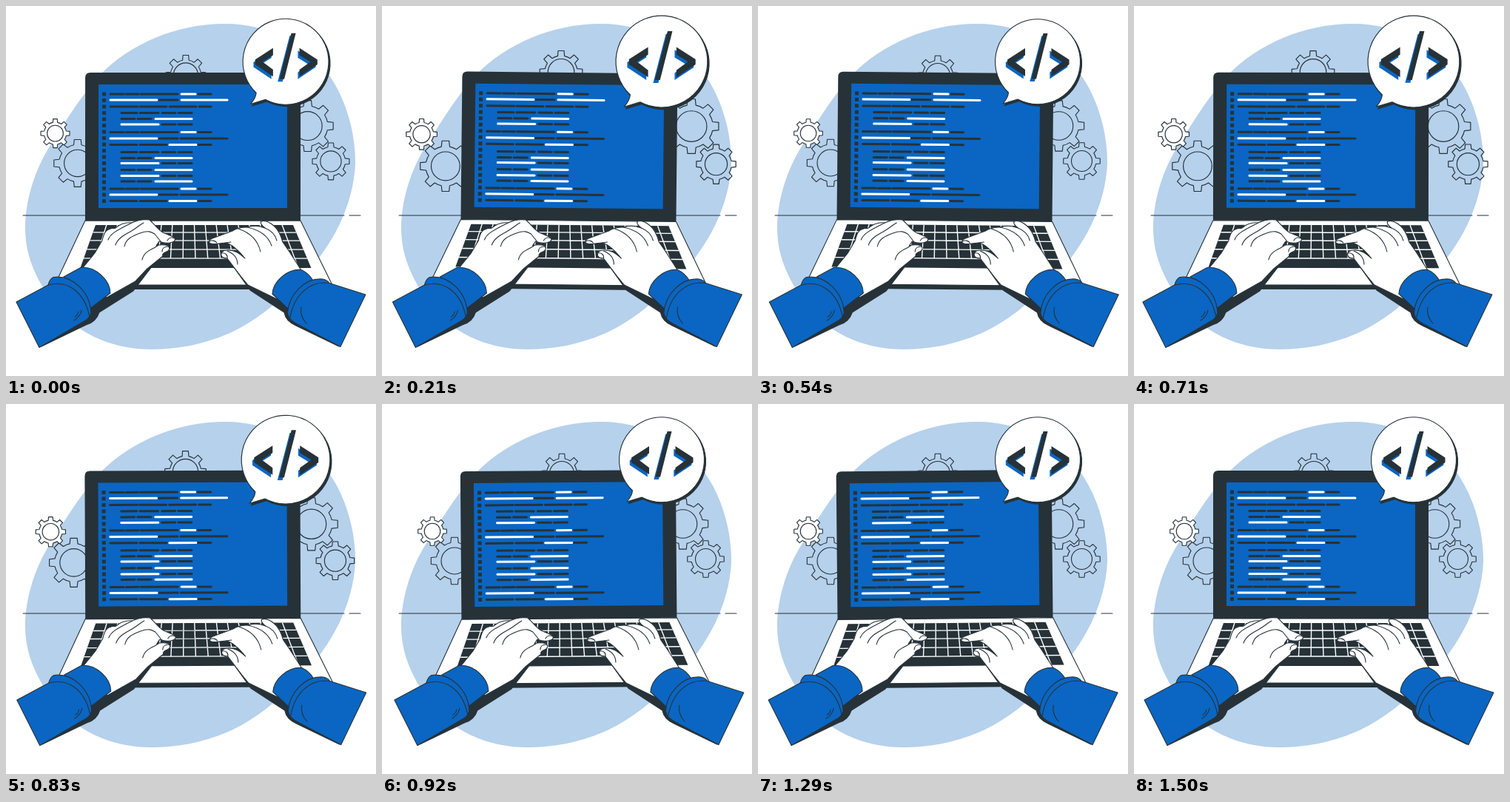
Write an HTML page that moves like this. It is 500 by 500 pixels and loops after 1.54 s.

```html
<!DOCTYPE html>
<html lang="en">
<head>
<meta charset="utf-8">
<title>Typing code</title>
<style>
  @property --t { syntax: '<number>'; inherits: true; initial-value: 0; }

  html, body { margin: 0; width: 100%; height: 100%; overflow: hidden; background: #fff; }
  svg {
    display: block; width: 100%; height: 100%;
    --ink: #263238; --blue: #0a66c2; --pale: #b6d1ec;
    animation: tick 1.54s steps(37) -4ms infinite;
  }
  /* One clock drives every part; 1 is a full cycle. */
  @keyframes tick { from { --t: .008; } to { --t: 1.0276; } }

  .beat {
    --h: max(0, min(var(--t) * 10, (.3 - var(--t)) * 5), min((var(--t) - .4) * 10, (.6 - var(--t)) * 10));
    transform: scale(calc(1 + .1 * var(--h)));
  }
  #gears { transform-origin: 255.5px 155px; }
  #bubble { transform-origin: 379px 77.5px; }
  #laptop {
    transform-origin: 253px 236px;
    transform: rotate(calc(1deg * max(min(var(--t) * 4, 2 - var(--t) * 4), var(--t) * 4 - 4)));
  }
  #hands {
    --v: max(var(--t) * 10 - 5, 5 - var(--t) * 10);
    transform: translateX(calc(1px * (8 * var(--v) - 4
      - 16 * max(0, var(--v) - 1) + 14 * max(0, var(--v) - 2)
      - 9 * max(0, var(--v) - 3) + 4 * max(0, var(--v) - 4))));
  }

  .ink { fill: var(--ink); }
  .blue { fill: var(--blue); }
  .white { fill: #fff; }
  .line { fill: none; }
  .edge { stroke: var(--ink); stroke-width: 1.1; stroke-linejoin: round; stroke-linecap: round; }
  #code path { stroke-width: 3; stroke-linecap: round; fill: none; }
  #keys { stroke: #fff; stroke-width: 1.4; fill: none; }
</style>
</head>
<body>
<svg viewBox="0 0 500 500">
  <defs>
    <path id="balloon" d="M338.500 117A57.500 57.500 0 1 1 351 126L331 132Q338 124 338.500 117Z"/>
    <g id="tag">
      <path d="M361 57V66.500L347 75.500L361 86V95L337 79V72.500Z"/>
      <path d="M385.500 37H391.500L376 98.500H369.500Z"/>
      <path d="M396.500 57L420.500 72.500V79L396.500 95V86L411 75.500L396.500 66.500Z"/>
    </g>
  </defs>

  <path fill="var(--pale)" d="M297 24C352 24 405 50 437 94C462 130 473 178 472 214C469 272 440 326 400 367C365 405 330 430 300 443C265 458 230 464 197 464C140 464 92 440 64 402C38 365 26 335 26 300C26 258 42 214 64 182C84 150 104 118 128 92C168 52 228 24 297 24Z"/>

  <g id="gears" class="beat edge"></g>
  <path class="edge line" d="M23 283H457M464 283H479"/>

  <g id="laptop">
    <path class="ink" d="M107 290V97Q107 90 114 90H391Q398 90 398 97V290Z"/>
    <path class="blue" d="M125 106H380V273H125Z"/>
    <g id="code"></g>
    <path class="white edge" d="M107 290H398L441 377H66Z"/>
    <path class="ink" d="M66 377H441.500L439 383H69Z"/>
    <path class="ink" d="M121 296H388L412.500 354H100.500Z"/>
    <path id="keys"/>
  </g>

  <g id="hands" class="edge">
    <!-- left -->
    <path class="ink" d="M48 460L108 431Q122 427 126 414L172 385L202 346L184 345L112 398Z"/>
    <path class="white" d="M103 355L120 334L130 317C132 309 134 303 140 301.500C143 300 146 301 148 300C154 295 162 292 170 293C178 289 187 288 194 289C200 294 205 302 212 306L226 312C230 314 229 318 225 319C218 322 212 320 207 318L203 324C210 322 216 323 219 324C222 327 221 331 217 332C212 334 211 336 212 338L191 355L175 372L136 394Z"/>
    <path class="line" d="M138 316C141 308 148 304 170 293M148 323C151 314 159 310 168 305S180 296 186 293M160 325C162 315 170 311 181 307S196 305 201 308L209 318M184 343C186 334 192 331 200 327L205 324M228 314C224 312 220 313 218 317M219 325C214 325 211 328 211 332"/>
    <path class="blue" d="M78 366L101 353.500C121 351 141 371 141 388L115 408Z"/>
    <path class="blue" d="M14 400L57 377Q59 369 64 366.500C90 363 114 387 115 415Q113 423 104 427L45 461.500Z"/>
    <path class="line" d="M57 377C82 370 106 385 113 420M102 411Q101 419 92 425M98 413Q97 418 93 420"/>

    <!-- right -->
    <path class="ink" d="M450 460L392 432Q378 426 376 414L330 384L305 349L322 345L392 398Z"/>
    <path class="white" d="M399 357L383 332L374 319C371 308 368 302 362 297C356 292 350 289 345 291C343 293 346 297 350 300C340 296 332 297 326 299C318 299 312 300 306 304L279 314C274 316 273 320 277 321C285 323 290 320 297 320C306 322 314 330 323 341C316 335 309 329 299 330C293 330 290 333 291 337C292 341 296 341 299 341L318 366L327 377L366 396Z"/>
    <path class="line" d="M314 301C326 305 340 314 344 332M326 299C340 302 354 309 359 324M350 300C358 303 364 309 366 317M297 320L304 319M313 349C313 341 309 335 299 331M275 318C278 316 283 317 285 320M291 334C296 333 300 336 299 341"/>
    <path class="blue" d="M415 371Q409 361 399 356.500C380 355 361 372 360 389L383 411Z"/>
    <path class="blue" d="M486 390L437 374.500Q434 370 428 369C404 367 382 390 380.500 415Q382 424 394 430L452 460.500Z"/>
    <path class="line" d="M437 374.500C412 371 390 388 384 421M399 407Q397 419 406 429"/>
  </g>

  <g id="bubble" class="beat">
    <use href="#balloon" class="ink edge" x="2" y="2.500"/>
    <use href="#balloon" class="white edge"/>
    <use href="#tag" class="blue" x="-2.200" y="3.500"/>
    <use href="#tag" class="ink"/>
  </g>
</svg>

<script>
  const $ = id => document.getElementById(id);

  function add(parent, d, attrs) {
    const p = document.createElementNS('http://www.w3.org/2000/svg', 'path');
    p.setAttribute('d', d);
    for (const k in attrs) p.setAttribute(k, attrs[k]);
    parent.appendChild(p);
  }

  // Eight-toothed wheel with a round hole
  function gear(x, y, R, root, hole, fill = 'none') {
    const at = (r, deg) => {
      const a = deg * Math.PI / 180;
      return (x + r * Math.sin(a)).toFixed(2) + ' ' + (y - r * Math.cos(a)).toFixed(2);
    };
    let d = '';
    for (let a = 0; a < 360; a += 45) {
      d += (a ? `A${root} ${root} 0 0 1 ` : 'M') + at(root, a - 12)
        + 'L' + at(R, a - 8) + 'L' + at(R, a + 8) + 'L' + at(root, a + 12);
    }
    d += `A${root} ${root} 0 0 1 ${at(root, -12)}Z`;
    d += `M${at(hole, 0)}A${hole} ${hole} 0 1 1 ${at(hole, 180)}A${hole} ${hole} 0 1 1 ${at(hole, 0)}Z`;
    add($('gears'), d, { fill });
  }
  gear(243, 94, 27, 20.5, 16.5);
  gear(98, 212, 32, 25, 18);
  gear(68, 172, 19.5, 15, 10.8, '#fff');
  gear(406.5, 162, 34.5, 27, 19.3);
  gear(437.5, 209.5, 25, 19.5, 14);

  // Code rows: segments as start-end, "w" marks white
  const kinds = {
    a: '141-159 162-179 182-232 237-256w 260-277',
    b: '141-204w 207-232 237-299w',
    c: '141-178 181-217 221-257 261-277',
    d: '156-177 181-206 211-229 233-251',
    e: '156-174 178-196 202-251w',
    f: '156-206w 211-229 233-251',
    g: '141-204w 207-232 236-299',
    h: '141-177 181-217 221-257w 260-277'
  };
  const tops = [119, 127, 136, 144.5, 152.5, 160, 170.5, 179, 187.5,
    197.5, 205.5, 212.5, 221.5, 229.5, 237, 247, 255, 263.5];
  [...'abcdefaghdefefeagh'].forEach((kind, i) => {
    for (const seg of kinds[kind].split(' ')) {
      const [from, to] = seg.split('-').map(parseFloat);
      add($('code'), `M${from} ${tops[i]}H${to}`,
        { stroke: seg.endsWith('w') ? '#fff' : 'var(--ink)' });
    }
    add($('code'), `M130 ${119 + 8.5 * i}h5`,
      { style: 'stroke-width:5;stroke-linecap:butt', stroke: 'var(--ink)' });
  });

  // Key gaps: rows between the slanted sides, then fanned columns
  let gaps = '';
  for (const y of [306, 317, 329, 341]) {
    const f = (y - 296) / 58;
    gaps += `M${121 - 20.5 * f} ${y}H${388 + 24.5 * f}`;
  }
  for (let i = 1; i < 18; i++) {
    const top = 121 + i * 267 / 18, low = 105 + i * 302 / 18;
    gaps += `M${top} 296L${low} 341`;
    if (i < 5 || i > 13) gaps += `L${low + (low - top) * 13 / 45} 354`;
  }
  $('keys').setAttribute('d', gaps);
</script>
</body>
</html>
```
